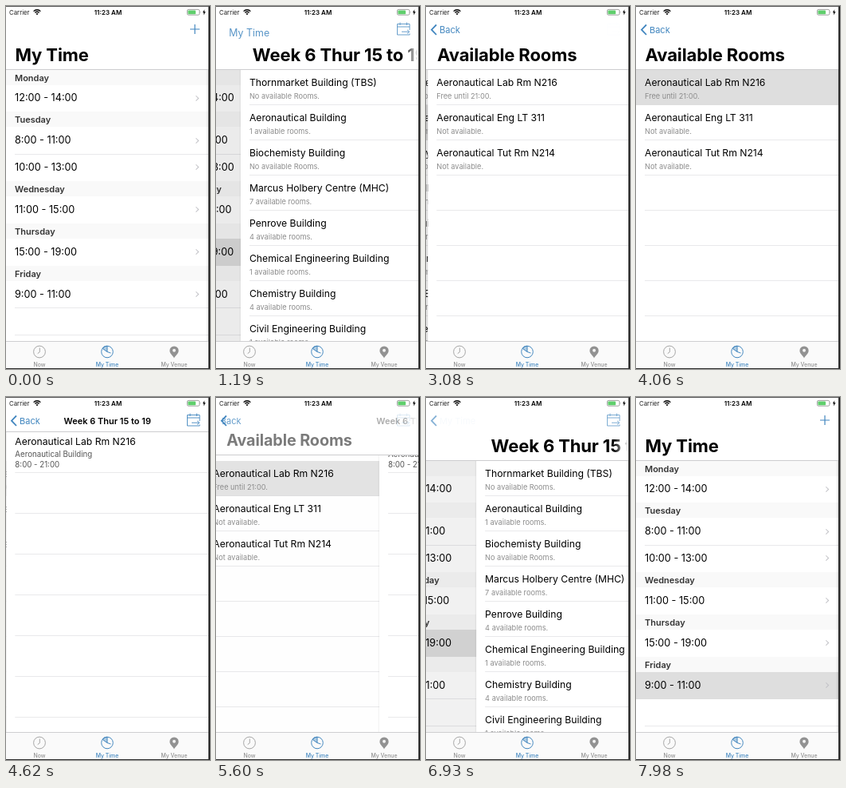
An HTML page for the animation above (8 s loop, 256 px wide and 454 px high).

```html
<!DOCTYPE html>
<html lang="en">
<head>
<meta charset="utf-8">
<title>My Time</title>
<style>
/* Navigation depth: one progress value per pushed screen */
@property --a { syntax: "<number>"; inherits: true; initial-value: 0; }
@property --b { syntax: "<number>"; inherits: true; initial-value: 0; }
@property --c { syntax: "<number>"; inherits: true; initial-value: 0; }

html, body { margin: 0; width: 100%; height: 100%; overflow: hidden; background: #fff; }
#stage {
  --slide: cubic-bezier(.36, .66, .04, 1);
  --blue: #4186bf;
  position: absolute; left: 0; top: 0; width: 256px; height: 454px; overflow: hidden;
  background: #fff; color: #000;
  font: 12.2px/20px Inter, "Liberation Sans", Arial, sans-serif;
  animation: push-a 8s var(--slide) infinite, push-b 8s var(--slide) infinite, push-c 8s var(--slide) infinite;
}
@keyframes push-a { 0%, 12.3125% { --a: 0; } 19.0625%, 85.875% { --a: 1; } 92.625%, 100% { --a: 0; } }
@keyframes push-b { 0%, 33.375% { --b: 0; } 40.125%, 75.9625% { --b: 1; } 82.7125%, 100% { --b: 0; } }
@keyframes push-c { 0%, 51.6875% { --c: 0; } 58.4375%, 67.9125% { --c: 1; } 74.6625%, 100% { --c: 0; } }

#stage div, #stage svg { position: absolute; }
.t { white-space: pre; }
.mid { transform: translateX(-50%); }

/* Lists */
.page { left: 0; top: 0; width: 254px; height: 454px; background: #fff; overflow: hidden; box-shadow: -1px 0 2px rgba(0, 0, 0, .07); }
.page::after { content: ""; position: absolute; inset: 0; background: #000; opacity: 0; }
#time { transform: translateX(calc(var(--a) * -76px)); }
#week { transform: translateX(calc((1 - var(--a)) * 254px - var(--b) * 76px)); }
#rooms { transform: translateX(calc((1 - var(--b)) * 254px - var(--c) * 76px)); }
#room { transform: translateX(calc((1 - var(--c)) * 254px)); }
#time::after { opacity: calc(var(--a) * var(--a) * .1); }
#week::after { opacity: calc(var(--b) * var(--b) * .1); }
#rooms::after { opacity: calc(var(--c) * var(--c) * .1); }

.head { left: 0; width: 254px; height: 19px; background: #f9f9f9; }
.day { font-size: 11px; font-weight: 600; color: #333; }
.slot { font-size: 12.7px; }
.sub { font-size: 9.2px; color: #8c8c8c; }
.dark { font-size: 9.7px; color: #555; }
.line { left: 11px; right: 0; height: 1px; background: #e9e9eb; }
.chev {
  left: 235.6px; width: 5.4px; height: 5.4px; box-sizing: border-box;
  border: solid #c2c2c7; border-width: 1px 1px 0 0; transform: rotate(45deg);
}
.hit { left: 0; width: 254px; background: #dedede; opacity: 0; animation: 8s ease-in-out infinite; }
.thu { animation-name: hit-thu; }
.fri { animation-name: hit-fri; }
.aero { animation-name: hit-aero; }
.lab { animation-name: hit-lab; }
@keyframes hit-thu { 0%, 10.45% { opacity: 0; } 10.46%, 85.875% { opacity: 1; } 92.625%, 100% { opacity: 0; } }
@keyframes hit-fri { 0%, 99.7% { opacity: 0; } 99.71%, 100% { opacity: 1; } }
@keyframes hit-aero { 0%, 33.2% { opacity: 0; } 33.21%, 75.9625% { opacity: 1; } 82.7125%, 100% { opacity: 0; } }
@keyframes hit-lab { 0%, 50.7% { opacity: 0; } 50.71%, 67.9125% { opacity: 1; } 74.6625%, 100% { opacity: 0; } }

#scroll {
  left: 250px; top: 82px; width: 2px; height: 159px; border-radius: 1px; background: #828282;
  animation: scroll 8s linear infinite;
}
@keyframes scroll { 0%, 20.5% { opacity: 0; } 23.6%, 40% { opacity: 1; } 40.2%, 100% { opacity: 0; } }

/* Navigation bar */
#nav {
  left: 0; top: 0; width: 254px; height: calc(80px - 36px * var(--c)); box-sizing: border-box;
  background: #fff; border-bottom: 1px solid #cdcdcf; overflow: hidden;
}
#titles { inset: 0; mask-image: linear-gradient(90deg, #000 236px, transparent 254px); }
.big {
  left: 11.5px; top: 46px; line-height: 30px; font-size: 22px; font-weight: 700;
  letter-spacing: -.12px; transform-origin: 0 50%; white-space: pre;
}
#big0 {
  opacity: calc(1 - 2.5 * var(--a));
  transform: translate(calc(6px * var(--a)), calc(-36px * var(--a))) scale(calc(1 - .52 * var(--a)));
}
#big1 {
  opacity: min(1 - 2.5 * var(--b), 2.2 * var(--a) - .6);
  transform: translate(calc((1 - var(--a)) * 282px + 6px * var(--b)), calc(-36px * var(--b))) scale(calc(1 - .52 * var(--b)));
}
#big2 {
  opacity: min(1 - 2.5 * var(--c), 2.2 * var(--b) - .6);
  transform: translate(calc((1 - var(--b)) * 282px + 6px * var(--c)), calc(-36px * var(--c))) scale(calc(1 - .52 * var(--c)));
}
#small {
  left: 127px; top: 19.5px; font-size: 11px; font-weight: 600; white-space: pre;
  opacity: calc(1.7 * var(--c));
  transform: translateX(calc(-50% + (1 - var(--c)) * 160px));
}
.icon { left: 226px; top: 20px; fill: none; stroke: var(--blue); }
#plus { opacity: calc(1 - 2 * var(--a)); }
#cal1 { opacity: min(var(--a), 1 - var(--b)); }
#cal3 { opacity: var(--c); }

#back { left: 5px; top: 22px; fill: none; stroke: var(--blue); animation: back 8s linear infinite; }
@keyframes back { 0%, 14.9% { opacity: 0; } 19.06%, 85.875% { opacity: 1; } 88%, 100% { opacity: 0; } }
#labels { left: 8px; top: 0; width: 200px; height: 80px; overflow: hidden; }
.label {
  left: 9px; top: 19.5px; font-size: 11px; color: var(--blue); white-space: pre;
  transform-origin: 0 50%; animation: 8s var(--slide) infinite;
}
#label1 { animation-name: label1; }
#label2 { animation-name: label2; }
#label3 { animation-name: label3; }
@keyframes label1 {
  0%, 12.3125% { opacity: 0; transform: translate(-6px, 31.5px) scale(2.06); }
  19.0625%, 33.375% { opacity: 1; transform: none; }
  40.125%, 75.9625% { opacity: 0; transform: translateX(-88px); }
  82.7125%, 84.84% { opacity: 1; transform: none; }
  84.85%, 85.875% { opacity: .3; }
  88%, 100% { opacity: 0; transform: none; }
}
@keyframes label2 {
  0%, 33.375% { opacity: 0; transform: translate(-6px, 31.5px) scale(2.06); }
  40.125%, 51.6875% { opacity: 1; transform: none; }
  58.4375%, 67.9125% { opacity: 0; transform: translateX(-58px); }
  74.6625%, 75.24% { opacity: 1; transform: none; }
  75.25%, 75.9625% { opacity: .3; }
  78%, 100% { opacity: 0; transform: none; }
}
@keyframes label3 {
  0%, 51.6875% { opacity: 0; transform: translate(-6px, 31.5px) scale(2.06); }
  58.4375%, 66.44% { opacity: 1; transform: none; }
  66.45%, 67.9125% { opacity: .3; }
  70%, 100% { opacity: 0; transform: none; }
}

/* Fixed chrome */
.carrier { font-size: 7.8px; color: #222; }
.clock { font-size: 8px; font-weight: 600; }
#tabs { left: 0; top: 419px; width: 254px; height: 35px; background: #fafafa; border-top: 1px solid #cfcfd1; box-sizing: border-box; }
.tab { font-size: 6.9px; font-weight: 500; color: #929292; }
.on { color: var(--blue); }
#edge { inset: 0; border: solid #2c2c2c; border-width: 1px 2px 1px 0; border-top-color: #555; }
</style>
</head>
<body>
<div id="stage">
  <div class="page" id="time"></div>
  <div class="page" id="week"></div>
  <div class="page" id="rooms"></div>
  <div class="page" id="room"></div>

  <div id="nav">
    <div id="titles">
      <div class="big" id="big0">My Time</div>
      <div class="big" id="big1">Week 6 Thur 15 to 19</div>
      <div class="big" id="big2">Available Rooms</div>
      <div id="small">Week 6 Thur 15 to 19</div>
    </div>
    <div id="labels">
      <div class="label" id="label1">My Time</div>
      <div class="label" id="label2">Back</div>
      <div class="label" id="label3">Back</div>
    </div>
    <svg id="back" width="10" height="16"><path d="M8 1.5 2 7.7 8 14" stroke-width="1.8"/></svg>
    <svg class="icon" id="plus" width="18" height="18"><path d="M11 3v12M5 9h12" stroke-width="1.2"/></svg>
    <svg class="icon" id="cal1" width="18" height="18">
      <path id="cal" d="M17 10V2.500H1.500v13.500H17V14.500M1.500 6H17M5 .5v3.500M13.500 .5v3.500M7 12.200h9.500M14 9.800l2.700 2.400-2.700 2.400" stroke-width=".9"/>
    </svg>
    <svg class="icon" id="cal3" width="18" height="18"><use href="#cal"/></svg>
  </div>

  <div id="status"></div>
  <svg width="256" height="16" style="left:0;top:0">
    <g fill="none" stroke="#000" stroke-width="1.3">
      <path d="M34.6 6.6a6.2 6.2 0 0 1 8.8 0M36.3 8.4a3.8 3.8 0 0 1 5.4 0"/>
    </g>
    <path d="M37.5 9.7a2.1 2.1 0 0 1 3 0L39 11.3z"/>
    <rect x="227.4" y="4.4" width="15.4" height="6.8" rx="1.6" fill="none" stroke="#8a8a8a" stroke-width=".8"/>
    <rect x="228.4" y="5.4" width="9.6" height="4.8" rx=".8" fill="#5fce6c"/>
    <path d="M243.8 6.5q1.2 1.3 0 2.6z" fill="#8a8a8a"/>
    <path d="M249.3 4.2 246.8 8.2h1.6l-.6 3.3 2.8-4.2h-1.7z"/>
  </svg>

  <div id="tabs"></div>
  <svg width="256" height="24" style="left:0;top:420px" fill="none">
    <g stroke="#9b9b9b" stroke-width=".9">
      <circle cx="42" cy="12.5" r="7.4"/>
      <path d="M42.3 7.5v5.2l-2.6 2"/>
    </g>
    <g stroke="#4186bf" stroke-width="1">
      <circle cx="127" cy="12.5" r="7.3"/>
      <path d="M127 12.5 121 8.3A7.3 7.3 0 0 1 127 5.2z" fill="#4186bf" fill-opacity=".4"/>
      <path d="M127 12.5l4.500 1.500"/>
    </g>
    <path d="M211 20.4c-1.2-3-5.6-5.5-5.6-9.4a5.6 5.6 0 0 1 11.2 0c0 3.9-4.4 6.4-5.6 9.4z" fill="#929292"/>
    <circle cx="211" cy="10.8" r="2" fill="#f4f4f4"/>
  </svg>
  <div id="edge"></div>
</div>

<script>
const $ = id => document.getElementById(id);
const text = (s, x, y, cls = "") =>
  `<div class="t ${cls}" style="left:${x}px;top:${y - 10}px">${s}</div>`;
const line = y => `<div class="line" style="top:${y - 0.5}px"></div>`;
const chev = y => `<div class="chev" style="top:${y - 2.7}px"></div>`;
const hit = (y, h, cls) => `<div class="hit ${cls}" style="top:${y}px;height:${h}px"></div>`;

const TOP = 79.5, ROW = 44, SLOT = 33.87, HEAD = 18.96;

function timetable() {
  const days = [
    ["Monday", "12:00 - 14:00"],
    ["Tuesday", "8:00 - 11:00", "10:00 - 13:00"],
    ["Wednesday", "11:00 - 15:00"],
    ["Thursday", "15:00 - 19:00"],
    ["Friday", "9:00 - 11:00"]
  ];
  const taps = { Thursday: "thu", Friday: "fri" };
  let y = TOP, out = "";
  for (const [day, ...slots] of days) {
    out += `<div class="head" style="top:${y}px"></div>` + text(day, 11, y + 10, "day");
    y += HEAD;
    slots.forEach((slot, i) => {
      if (i) out += line(y);
      if (day === "Friday") out += line(y + SLOT);
      if (taps[day]) out += hit(y, SLOT + 0.5, taps[day]);
      out += text(slot, 11, y + SLOT / 2, "slot") + chev(y + SLOT / 2);
      y += SLOT;
    });
  }
  return out + line(y + SLOT);
}

function list(items, tapped, tap, arrows) {
  let out = "";
  for (let i = 0; i < 8; i++) {
    const y = TOP + i * ROW;
    out += line(y + ROW);
    if (i === tapped) out += hit(y, ROW + 0.5, tap);
    if (!items[i]) continue;
    out += text(items[i][0], 11, y + 16) + text(items[i][1], 11, y + 33, "sub");
    if (arrows) out += chev(y + 22.5);
  }
  return out;
}

const free = n => n ? `${n} available rooms.` : "No available Rooms.";
const buildings = [
  ["Thornmarket Building (TBS)", 0],
  ["Aeronautical Building", 1],
  ["Biochemisty Building", 0],
  ["Marcus Holbery Centre (MHC)", 7],
  ["Penrove Building", 4],
  ["Chemical Engineering Building", 1],
  ["Chemistry Building", 4],
  ["Civil Engineering Building", 1]
].map(([name, n]) => [name, free(n)]);

const rooms = [
  ["Aeronautical Lab Rm N216", "Free until 21:00."],
  ["Aeronautical Eng LT 311", "Not available."],
  ["Aeronautical Tut Rm N214", "Not available."]
];

$("time").innerHTML = timetable();
$("week").innerHTML = list(buildings, 1, "aero", true) + '<div id="scroll"></div>';
$("rooms").innerHTML = list(rooms, 0, "lab", false);
$("room").innerHTML =
  text("Aeronautical Lab Rm N216", 11, 56) +
  text("Aeronautical Building", 11, 71.5, "sub dark") +
  text("8:00 - 21:00", 11, 84.5, "sub dark") +
  Array.from({ length: 7 }, (_, i) => line(94.5 + i * 51)).join("");

$("status").innerHTML = text("Carrier", 4, 8, "carrier") + text("11:23 AM", 128, 8, "clock mid");
$("tabs").innerHTML =
  text("Now", 42, 28.5, "tab mid") +
  text("My Time", 127, 28.5, "tab mid on") +
  text("My Venue", 211, 28.5, "tab mid");
</script>
</body>
</html>
```
